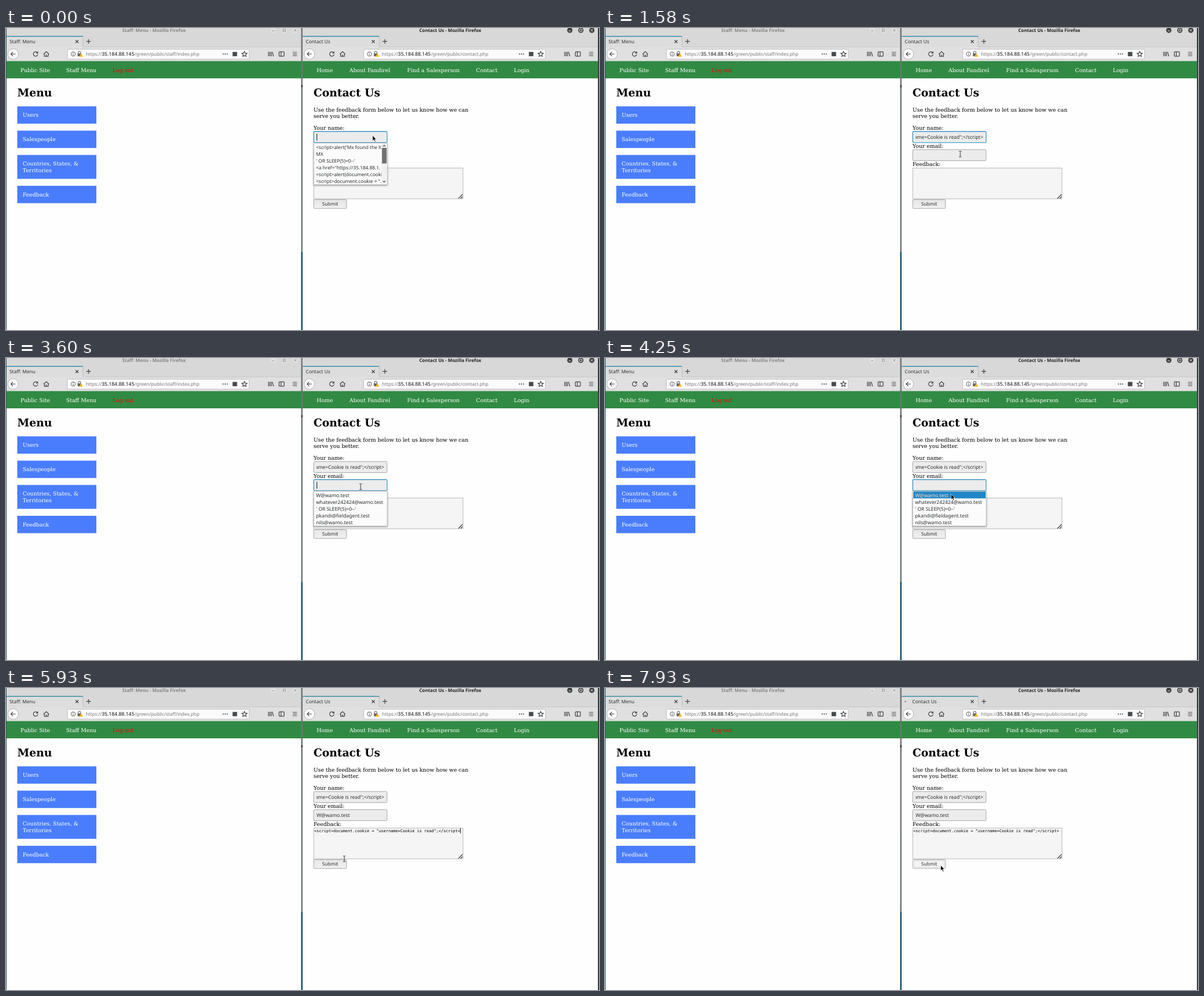
Recreate the animation shown at these times as an HTML page. Size 1050 px wide and 534 px high, loop 8000 ms.

```html
<!DOCTYPE html>
<html lang="en">
<head>
<meta charset="utf-8">
<title>Contact form</title>
<style>
  html, body { margin: 0; width: 100%; height: 100%; overflow: hidden; background: #fefefe; }
  svg { display: block; width: 1050px; height: 534px; }
  text { font: 8.5px "Noto Sans", "Open Sans", sans-serif; fill: #2b2f30; text-rendering: geometricPrecision; white-space: pre; }
  .page text { font: 9.58px "DejaVu Serif", "Noto Serif", serif; fill: #000; }
  .page .h1 { font-size: 19.2px; font-weight: bold; }
  .page .nav text, .page .card text { fill: #fff; }
  .page .nav .out { fill: #f00000; }
  .card rect { fill: #4a7dfd; }
  .title { font-size: 8.15px; font-weight: bold; text-anchor: middle; }
  .url { font-size: 8.28px; fill: #777; }
  .host { font-size: 8.85px; fill: #111; }
  .line { fill: none; stroke: #3c4042; stroke-width: 1.2; }
  .field { fill: #ececec; stroke: #a4a4a4; }
  .focus { fill: none; stroke: #4ba3d3; stroke-width: 1.3; }
  .value { font-size: 8.73px; }
  .code { font: 7.04px "DejaVu Sans Mono", "Liberation Mono", monospace; fill: #000; }
  .caret { fill: #111; }
  .popup { fill: #fbfbfb; stroke: #bdbdbd; stroke-width: .8; filter: drop-shadow(0 1px 1.5px #0007); }
  .popup2 text { font-size: 8.73px; }
</style>
</head>
<body>
<svg viewBox="0 0 1050 534">
  <defs>
    <clipPath id="nameClip"><rect x="550" y="184" width="121" height="18"/></clipPath>
    <clipPath id="listClip"><rect x="546" y="204" width="119" height="72"/></clipPath>
    <linearGradient id="fade" x2="0" y2="1">
      <stop stop-color="#e6e6e6"/><stop offset="1" stop-color="#f1f1f1"/>
    </linearGradient>
  </defs>
  <rect width="1050" height="534" fill="#fefefe"/>
  <g id="chrome"></g>

  <g class="page">
    <g class="nav">
      <rect x="1" y="58.5" width="522" height="30.5" fill="#318a43"/>
      <rect x="525" y="58.5" width="523" height="30.5" fill="#318a43"/>
      <text x="25.5" y="78">Public Site</text>
      <text x="106.5" y="78">Staff Menu</text>
      <text x="188.5" y="78" class="out">Log out</text>
      <text x="550" y="78">Home</text>
      <text x="608" y="78">About Fandirel</text>
      <text x="710.3" y="78">Find a Salesperson</text>
      <text x="832.3" y="78">Contact</text>
      <text x="899.3" y="78">Login</text>
    </g>
    <text x="20" y="120.5" class="h1">Menu</text>
    <g class="card" id="cards"></g>
    <text x="544.5" y="120.5" class="h1">Contact Us</text>
    <text x="544.5" y="147.5">Use the feedback form below to let us know how we can</text>
    <text x="544.5" y="159">serve you better.</text>
    <text x="544.5" y="180">Your name:</text>
    <text x="544.5" y="212.3">Your email:</text>
    <text x="544.5" y="244.3">Feedback:</text>
  </g>

  <!-- form -->
  <rect class="field" x="544.9" y="183" width="129.8" height="19.6" rx="1.5"/>
  <rect class="field" x="544.9" y="215" width="129.8" height="19.6" rx="1.5"/>
  <rect class="focus" x="544.9" y="183" width="129.8" height="19.6" rx="1.5" data-on="0-3120"/>
  <rect class="focus" x="544.9" y="215" width="129.8" height="19.6" rx="1.5" data-on="3120-4830"/>
  <rect x="544.9" y="247.7" width="264.2" height="54.3" fill="#f5f5f5" stroke="#aeaeae" stroke-width=".9"/>
  <path d="M801 301.5l7.5-7.5M805 301.5l3.5-3.5" class="line" stroke-width=".9"/>
  <rect x="544.9" y="303.5" width="58" height="15.6" rx="1.5" fill="url(#fade)" stroke="#a4a4a4"/>
  <rect x="545.4" y="304" width="57" height="14.6" rx="1" fill="#f3f3f3" data-on="6080-7780 7930-8000"/>
  <rect x="545.4" y="304" width="57" height="14.6" rx="1" fill="#d2d2d2" data-on="7780-7930"/>
  <rect x="547" y="305.5" width="54" height="11.6" fill="none" stroke="#b4b4b4" stroke-width=".7" stroke-dasharray="1 .6" data-on="7780-8000"/>
  <text x="574" y="314.3" text-anchor="middle">Submit</text>

  <g clip-path="url(#nameClip)" data-on="780-8000">
    <text class="value" x="669.7" y="196" text-anchor="end">&lt;script&gt;document.cookie = "username=Cookie is read";&lt;/script&gt;</text>
  </g>
  <text class="value" x="550" y="228" data-on="4400-8000">W@wamo.test</text>
  <text class="code" x="545.8" y="255.2" data-on="5680-8000">&lt;script&gt;document.cookie = "username=Cookie is read";&lt;/script&gt;</text>
  <g class="caret">
    <rect x="550" y="187" width="1" height="12" data-on="0-250"/>
    <rect x="670" y="187" width="1" height="12" data-on="780-1460 2690-3120"/>
    <rect x="550" y="219" width="1" height="12" data-on="3120-4250"/>
    <rect x="609" y="219" width="1" height="12" data-on="4400-4830"/>
    <rect x="546" y="248" width="1" height="9" data-on="4950-5680"/>
    <rect x="804" y="248" width="1" height="9" data-on="5680-6200 7350-7780"/>
  </g>

  <!-- suggestion lists -->
  <g data-on="0-780">
    <rect class="popup" x="545" y="203.6" width="130" height="73.4"/>
    <g clip-path="url(#listClip)" id="nameList"></g>
    <rect x="665" y="204" width="9.6" height="72.6" fill="#f1f1f1"/>
    <rect x="665.7" y="212" width="8.2" height="27.5" fill="#707070"/>
    <path class="line" d="M667.3 209.6l2.3-2.3 2.3 2.3M667.3 270.4l2.3 2.3 2.3-2.3"/>
  </g>
  <g class="popup2" data-on="3360-4400">
    <rect class="popup" x="545" y="235.4" width="130" height="61.6"/>
    <rect x="546" y="236.2" width="128" height="12" fill="#2086c7" data-on="4130-4400"/>
    <g id="mailList"></g>
    <text x="549" y="245.6" style="fill:#fff" data-on="4130-4400">W@wamo.test</text>
  </g>

  <path id="arrow" d="M0 0v9.6l2.2-2 1.6 3.6 1.6-.8-1.6-3.4h2.9z" stroke="#fff" stroke-width=".7"/>
  <path id="beam" d="M-2.3 -5h1.6l.7 .6 .7-.6h1.6M0 -4.4v8.8M-2.3 5h1.6l.7-.6 .7 .6h1.6" fill="none" stroke="#333" stroke-width="1"/>
</svg>
<script>
const byId = id => document.getElementById(id);
const esc = s => s.replace(/&/g, '&amp;').replace(/</g, '&lt;');

// Browser frame; x is the window's left side
function browser(x, width, title, tab, path, active) {
  const ink = active ? '#222' : '#858585';
  const buttons = [473, 492.5, 512].map((c, i) => {
    const glyph = ['M-2 1h4', 'M-2 -2h4v4h-4z', 'M-2 -2l4 4m0-4l-4 4'][i];
    return `<g transform="translate(${c} 4)">` +
      `<circle r="4.7" fill="${active ? '#3c3f40' : '#e2e2e2'}"/>` +
      `<path d="${glyph}" fill="none" stroke="${active ? '#eee' : '#8a8a8a'}" stroke-width="1"/></g>`;
  }).join('');
  const label = active
    ? `<text x="6" y="27" data-on="0-7930">${tab}</text>
       <g data-on="7930-8000"><circle cx="7" cy="24" r="1.1" fill="#666"/><text x="19.3" y="27">${tab}</text></g>`
    : `<text x="6" y="27">${tab}</text>`;
  return `<g transform="translate(${x} 0)">
    <rect x=".5" width="${width}" height="58.5" fill="#d8d8d8"/>
    <rect x=".5" y="14" width="135.5" height="20" fill="#dddddd"/>
    <rect x=".5" y="33.5" width="${width}" height="25" fill="#e0e0e0"/>
    <path d="M136 33.5H${width}" stroke="#c4c4c4" stroke-width=".8"/>
    <path d="M136.2 15v18" stroke="#b5b5b5" stroke-width=".8"/>
    <rect x=".5" y="14" width="135.5" height="1.4" fill="#2f85a6"/>
    <text class="title" x="261.8" y="7.2" style="fill:${ink}">${title}</text>
    <g ${active ? 'transform="translate(.5 0)"' : ''}>${buttons}</g>
    ${label}
    <path class="line" d="M123 21.5l5 5m0-5l-5 5M142 23.7h8m-4-4v8"/>
    <circle cx="12.4" cy="46" r="9.4" fill="#fafafa" stroke="#a8a8a8" stroke-width=".9"/>
    <path class="line" stroke-width="1.5" d="M16.5 46H8.5m3.6-3.7L8.4 46l3.7 3.7"/>
    <path class="line" d="M55 43.3a3.9 3.9 0 1 0 1 3.2M56 41.5v2.8h-2.8"/>
    <path class="line" d="M66.3 46.3l4.8-4.5 4.8 4.5M67.8 46v4.2h6.6V46M71.1 50v-3"/>
    <rect x="108.5" y="37.5" width="322" height="17.5" rx="1.5" fill="#fbfbfb" stroke="#b9b9b9" stroke-width=".9"/>
    <circle cx="118.8" cy="46" r="3.8" fill="none" stroke="#555" stroke-width=".9"/>
    <path d="M118.8 45.4v2.9M118.8 43.4v1" stroke="#555" stroke-width="1"/>
    <path d="M127.6 45v-1.6a2.2 2.2 0 0 1 4.4 0V45" fill="none" stroke="#666" stroke-width="1.1"/>
    <rect x="126.6" y="45" width="6.4" height="5" fill="#666"/>
    <path d="M132.7 44.8l3.4 6h-6.8z" fill="#f5b51c"/>
    <text class="url" x="141" y="49.2">https://</text>
    <text class="host" x="169.3" y="49.2">35.184.88.145</text>
    <text class="url" x="227.6" y="49.2">${path}</text>
    <path d="M384.3 46h.1m3.5 0h.1m3.5 0h.1" stroke="#444" stroke-width="2" stroke-linecap="round"/>
    <rect x="401" y="42.3" width="8" height="7.6" fill="#484c4e"/>
    <path class="line" stroke-width="1" d="M422 41.4l1.4 3 3.2.4-2.4 2.2.7 3.2-2.9-1.6-2.9 1.6.7-3.2-2.4-2.2 3.2-.4z"/>
    <path class="line" d="M464.5 42v8M467 42v8M469.5 42v8M471.3 42.2l2.2 7.8"/>
    <rect class="line" x="483.3" y="42.2" width="9" height="7.6" rx="1"/>
    <path class="line" d="M486.8 42.5v7M507.5 43h7.5M507.5 46h7.5M507.5 49h7.5"/>
  </g>`;
}

byId('chrome').innerHTML =
  browser(.2, 522.5, 'Staff: Menu - Mozilla Firefox', 'Staff: Menu', '/green/public/staff/index.php', false) +
  browser(524.8, 523.5, 'Contact Us - Mozilla Firefox', 'Contact Us', '/green/public/contact.php', true) +
  `<rect width="1" height="534" fill="#23566a"/>
   <rect x="522.6" width="2.6" height="396" fill="#707475"/>
   <rect x="522.6" y="396" width="2.6" height="138" fill="#0f4d63"/>
   <rect x="523" y="101" width="2" height="4" fill="#222"/>
   <rect x="1048.2" width="1.8" height="534" fill="#24292c"/>`;

byId('cards').innerHTML = [
  [138.5, 'Users'], [181.5, 'Salespeople'],
  [224.5, 'Countries, States, &', 'Territories'], [279, 'Feedback']
].map(([y, ...rows]) =>
  `<rect x="20" y="${y}" width="140" height="${19.2 + 11.5 * rows.length}"/>` +
  rows.map((row, i) => `<text x="29.5" y="${y + 18.8 + 11.5 * i}">${esc(row)}</text>`).join('')
).join('');

const list = (id, y, rows) => byId(id).innerHTML = rows.map((row, i) =>
  `<text x="549" y="${y + 12.1 * i}">${esc(row)}</text>`).join('');
list('nameList', 213.5, [
  "<script>alert('Mx found the X.", 'MX', "' OR SLEEP(5)=0--'",
  '<a href="https://35.184.88.1.', '<script>alert(document.cookie', '<script>document.cookie = ".'
]);
list('mailList', 245.6, [
  'W@wamo.test', 'whatever242424@wamo.test', "' OR SLEEP(5)=0--'",
  'pkandi@fieldagent.test', 'nils@wamo.test'
]);

// Pointer positions: start time, x, y, shape
const moves = [
  [0, 649, 190, 'arrow'], [780, 649, 190, 'beam'], [1180, 645, 201, 'beam'],
  [1310, 639, 213.5, 'beam'], [1460, 632, 220, 'beam'], [1580, 629, 223, 'beam'],
  [2410, 627.7, 220, 'beam'], [3480, 628, 225, 'beam'], [3600, 628, 227.5, 'beam'],
  [3740, 624, 231, 'beam'], [3860, 616, 238, 'arrow'], [3980, 613, 240.7, 'arrow'],
  [4680, 615, 253, 'beam'], [4830, 612, 255, 'beam'], [4950, 610.7, 255, 'beam'],
  [5410, 608, 259, 'beam'], [5530, 604, 265, 'beam'], [5680, 602, 277, 'beam'],
  [5800, 600, 291, 'beam'], [5930, 599, 302, 'beam'], [6080, 596, 310, 'arrow'],
  [6200, 594.4, 313.5, 'arrow']
];

const timed = [...document.querySelectorAll('[data-on]')].map(el =>
  [el, el.dataset.on.split(' ').map(span => span.split('-').map(Number))]);

function draw(now) {
  const t = now % 8000;
  for (const [el, spans] of timed)
    el.style.display = spans.some(([from, to]) => t >= from && t < to) ? '' : 'none';
  const [, x, y, shape] = moves.findLast(move => move[0] <= t);
  for (const id of ['arrow', 'beam']) {
    byId(id).style.display = id === shape ? '' : 'none';
    byId(id).setAttribute('transform', `translate(${x} ${y})`);
  }
}

function loop() {
  draw(performance.now());
  requestAnimationFrame(loop);
}
loop();
</script>
</body>
</html>
```
